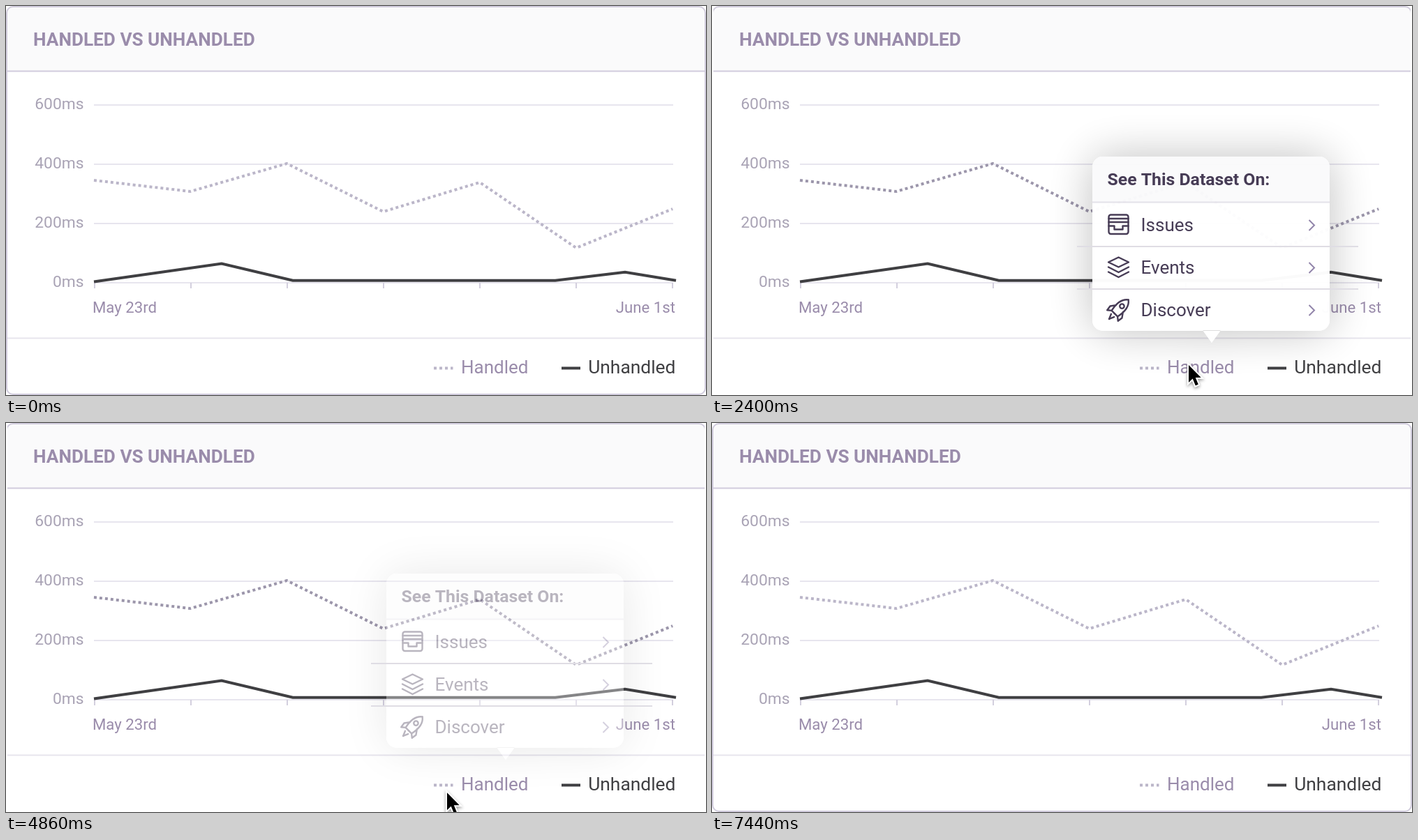
These frames come from a looping animation (1003x558 px, 8.06 s). An HTML page with a canvas:

```html
<!DOCTYPE html>
<html lang="en">
<head>
<meta charset="utf-8">
<title>Handled vs Unhandled</title>
<style>
  html, body { margin: 0; width: 100%; height: 100%; overflow: hidden; background: #fff; }
  canvas { display: block; }
</style>
</head>
<body>
<canvas id="stage" width="1003" height="558"></canvas>
<script>
const W = 1003, H = 558, LOOP = 8060, FADE = 400;
const ctx = document.getElementById('stage').getContext('2d');

const BORDER = '#d1ccdd', GRID = '#e7e5ee', TICK = '#d3cfde', HEADER = '#fafafb';
const MUTED = '#a9a3b5', PURPLE = '#9a8cab', INK = '#3f3f42', PLUM = '#433852';
const DOTS = '#bbb6c9', DOTS_HOVER = '#9c96ab', DASH = [4, 4];

const LEFT = 126, STEP = 138.2;
const handled = [250, 266, 226, 295, 253, 347, 291].map((y, i) => [LEFT + i * STEP, y]);
const unhandled = [[126, 395.5], [309, 369.5], [411, 393.7], [787, 393.7], [887, 381.8], [960, 393.7]];

const easeOut = p => 1 - (1 - p) ** 2;
const easeIn = p => p ** 1.7;
const linear = p => p;

// Spans in which the pointer hovers over the "Handled" legend
const hovers = [{ on: 2060, off: 3720 }, { on: 4780, off: 6180 }];

// Pointer strokes; between them it rests. "bend" bows the path sideways.
const shown = { from: 320, to: 7440, x: 841, y: 25 };
const strokes = [
  { from: 320, to: 420, x: 628, y: 190, ease: linear },
  { from: 1040, to: 1180, x: 640, y: 311, ease: easeOut, bend: -15 },
  { from: 1560, to: 2380, x: 682, y: 513, ease: easeOut, bend: 18 },
  { from: 3600, to: 4100, x: 484, y: 520, ease: easeOut },
  { from: 4360, to: 5220, x: 662, y: 530, ease: easeOut },
  { from: 6040, to: 6320, x: 816, y: 517, ease: linear },
  { from: 6320, to: 6940, x: 925, y: 157, ease: easeIn, bend: 22 },
  { from: 7240, to: 7440, x: 928, y: 8, ease: linear }
];

function text(c, str, x, y, size, color, align = 'left', weight = 400) {
  c.font = `${weight} ${size}px Roboto, sans-serif`;
  c.textAlign = align;
  c.fillStyle = color;
  c.fillText(str, x, y);
}

function line(c, pts, color, width, dash = []) {
  c.beginPath();
  pts.forEach(([x, y]) => c.lineTo(x, y));
  c.strokeStyle = color;
  c.lineWidth = width;
  c.setLineDash(dash);
  c.stroke();
  c.setLineDash([]);
}

const rule = (c, x0, x1, y, color, width = 2, dash) =>
  line(c, [[x0, y], [x1, y]], color, width, dash);

function drawCard(hover) {
  ctx.fillStyle = '#fff';
  ctx.fillRect(0, 0, W, H);
  ctx.beginPath();
  ctx.roundRect(1, 1, W - 2, H - 2, 9);
  ctx.save();
  ctx.clip();
  ctx.fillStyle = HEADER;
  ctx.fillRect(0, 0, W, 93);
  ctx.restore();
  ctx.strokeStyle = BORDER;
  ctx.lineWidth = 2;
  ctx.stroke();
  if (hover) {
    // Only the top edge of the border stays
    ctx.fillStyle = '#fff';
    ctx.fillRect(0, 4, 2, H);
    ctx.fillRect(W - 2, 4, 2, H);
    ctx.fillRect(0, H - 12, W, 12);
  }
  rule(ctx, 2, W - 2, 93.5, BORDER);
  rule(ctx, 2, W - 2, 476.5, GRID);
  text(ctx, 'HANDLED VS UNHANDLED', 39, 57, 26.2, PURPLE, 'left', 600);
}

function drawChart(hover) {
  for (let i = 0; i < 4; i++) {
    const y = 142 + i * 85;
    rule(ctx, LEFT, 956, y, GRID);
    text(ctx, `${600 - i * 200}ms`, 111.5, y + 6, 22.8, MUTED, 'right');
  }
  for (let i = 0; i < 7; i++) {
    const x = LEFT + 1 + i * 138;
    line(ctx, [[x, 397], [x, 405]], TICK, 2);
  }
  line(ctx, handled, hover ? DOTS_HOVER : DOTS, 4, DASH);
  line(ctx, unhandled, INK, 4);
  text(ctx, 'May 23rd', 124, 440, 22.2, PURPLE);
  text(ctx, 'June 1st', 959, 440, 22.2, PURPLE, 'right');
}

function drawLegend() {
  rule(ctx, 613, 640.5, 519.5, DOTS, 4, DASH);
  text(ctx, 'Handled', 652, 526.5, 26, PURPLE);
  rule(ctx, 796, 823, 519.5, INK, 4);
  text(ctx, 'Unhandled', 959.5, 526.5, 26.4, INK, 'right');
}

function trayIcon(c) {
  c.beginPath();
  c.roundRect(-14, -14, 28, 27.5, 3);
  c.stroke();
  c.stroke(new Path2D('M-14-8.5H14M-14-3.5H14M-14 2H-6V7H6V2H14'));
}

function layersIcon(c) {
  c.stroke(new Path2D('M0-14L14.5-7L0 0L-14.5-7Z'));
  for (const y of [0, 7]) line(c, [[-14.5, y], [0, y + 7.5], [14.5, y]], PLUM, 2.4);
}

function rocketIcon(c) {
  c.rotate(Math.PI / 4);
  c.beginPath();
  c.arc(0, -7, 3.2, 0, 7);
  c.stroke();
  for (const side of [1, -1]) {
    c.save();
    c.scale(side, 1);
    c.stroke(new Path2D('M0-20C8-14 9-5 6 8H0M7-2L12 5L11 12L6 8M3 12L0 19'));
    c.restore();
  }
}

const rows = [
  { label: 'Issues', icon: trayIcon },
  { label: 'Events', icon: layersIcon },
  { label: 'Discover', icon: rocketIcon }
].map((row, i) => ({ ...row, y: 314.5 + i * 61 }));

function makePopup() {
  const cv = document.createElement('canvas');
  cv.width = W;
  cv.height = H;
  const c = cv.getContext('2d');
  const box = new Path2D('M703 465L716 483L729 465Z');
  box.roundRect(545, 216, 340, 250, 15);

  c.shadowColor = 'rgba(0,0,0,.26)';
  c.shadowBlur = 66;
  c.fillStyle = '#fff';
  c.fill(box);
  c.shadowColor = 'transparent';
  c.fill(box);

  c.beginPath();
  c.roundRect(545, 216, 340, 65, [15, 15, 0, 0]);
  c.fillStyle = HEADER;
  c.fill();
  rule(c, 545, 885, 281.5, '#e4e2e9');
  text(c, 'See This Dataset On:', 566.5, 257, 24.8, PLUM, 'left', 600);

  for (const { label, icon, y } of rows) {
    text(c, label, 614.5, y + 8, 26, PLUM);
    line(c, [[855.5, y - 7.5], [863, y], [855.5, y + 7.5]], '#8f82a8', 2);
    c.save();
    c.translate(582.5, y - 1);
    c.strokeStyle = PLUM;
    c.lineWidth = 2.4;
    c.lineJoin = c.lineCap = 'round';
    icon(c);
    c.restore();
  }
  return cv;
}

const popup = makePopup();
const arrow = new Path2D('M0 0V25L5.7 19.5L9.8 29.5L13.8 27.8L9.8 18H17.7Z');

function popupAlpha(t) {
  const span = hovers.find(h => t >= h.on && t < h.off + FADE);
  if (!span) return 0;
  const part = since => easeOut(Math.min(1, (t - since) / FADE));
  return t < span.off ? part(span.on) : 1 - part(span.off);
}

function pointerAt(t) {
  let { x, y } = shown;
  for (const s of strokes) {
    if (t <= s.from) break;
    const k = s.ease(Math.min(1, (t - s.from) / (s.to - s.from)));
    x += (s.x - x) * k + (s.bend || 0) * Math.sin(Math.PI * k);
    y += (s.y - y) * k;
  }
  return [x, y];
}

function drawPointer(t) {
  if (t < shown.from || t >= shown.to) return;
  const [x, y] = pointerAt(t);
  ctx.save();
  ctx.translate(x + 1, y + 2);
  ctx.strokeStyle = '#fff';
  ctx.lineWidth = 4;
  ctx.shadowColor = 'rgba(0,0,0,.4)';
  ctx.shadowBlur = 4;
  ctx.shadowOffsetY = 2;
  ctx.stroke(arrow);
  ctx.shadowColor = 'transparent';
  ctx.fillStyle = '#000';
  ctx.fill(arrow);
  ctx.restore();
}

function render(t) {
  const hover = hovers.some(h => t >= h.on && t < h.off);
  drawCard(hover);
  drawChart(hover);
  drawLegend();
  ctx.globalAlpha = popupAlpha(t);
  ctx.drawImage(popup, 0, 0);
  ctx.globalAlpha = 1;
  if (hover) rows.slice(0, 2).forEach(({ y }) => rule(ctx, 523, 926, y + 30.5, '#dfdde4'));
  drawPointer(t);
}

const start = performance.now();
function tick() {
  render((performance.now() - start) % LOOP);
  requestAnimationFrame(tick);
}
tick();
</script>
</body>
</html>
```
